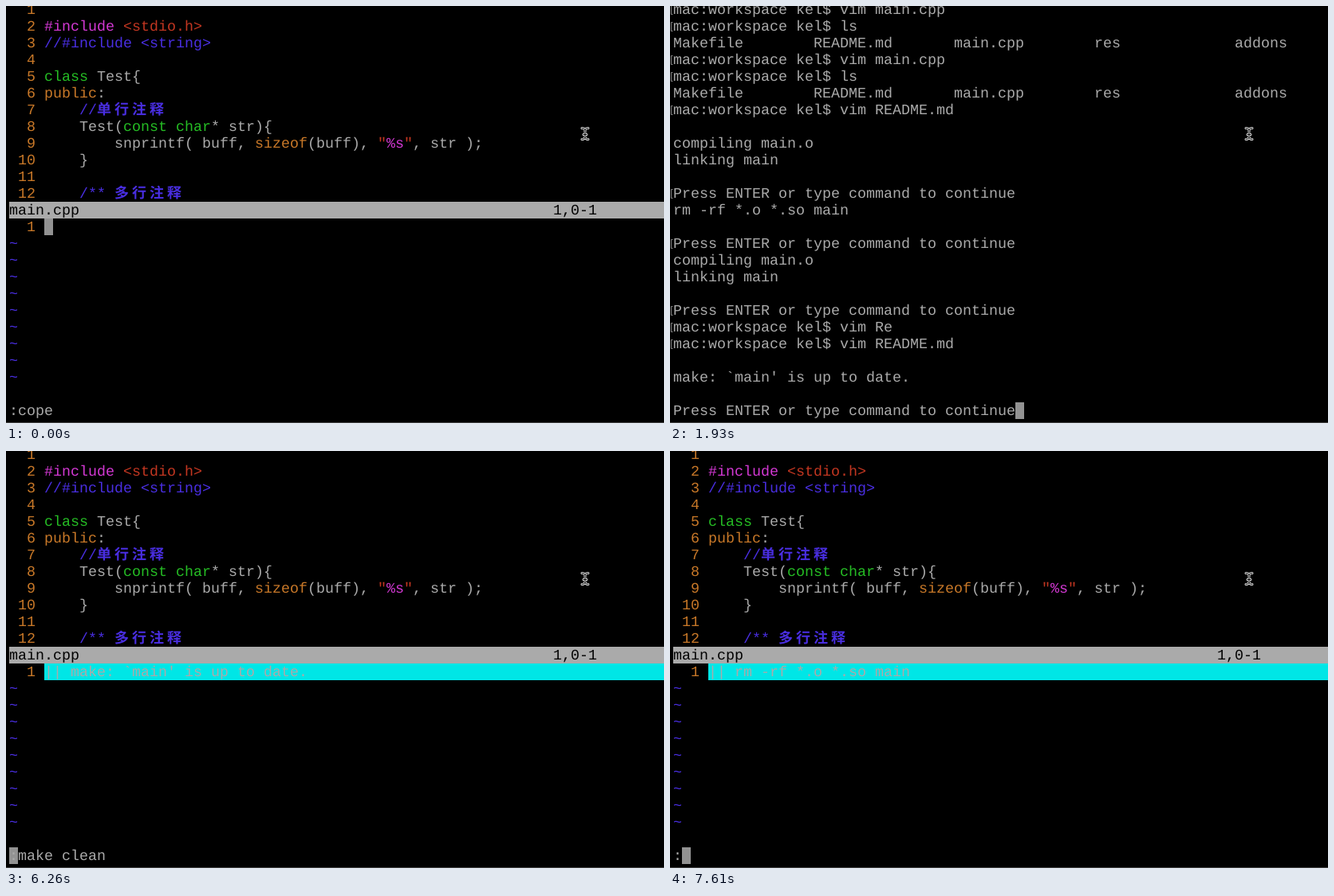
Write an HTML page that moves like this. It is 825 px wide and 524 px high and loops after 8 s.

```html
<!DOCTYPE html>
<html lang="en">
<head>
<meta charset="utf-8">
<title>Terminal editor</title>
<style>
  html, body { margin: 0; width: 100%; height: 100%; overflow: hidden; background: #000; }
  svg { display: block; width: 825px; height: 524px; }
  text {
    font: 18.33px "Liberation Mono", "Courier New", monospace;
    white-space: pre;
    text-rendering: geometricPrecision;
    fill: #aaa;
  }
  .cjk { font: bold 18px "Noto Sans CJK SC", "Noto Sans CJK", sans-serif; letter-spacing: 4px; }
  .orange { fill: #c87828; }
  .blue { fill: #492ee1; }
  .green { fill: #25bc24; }
  .magenta { fill: #d338d3; }
  .red { fill: #c23621; }
  .dark { fill: #000; }
  .mark { fill: none; stroke: #858585; }
</style>
</head>
<body>
<svg id="stage" viewBox="0 0 825 524"></svg>
<script>
const LOOP = 8000, CELL = 11, LINE = 21, QUICKFIX = 13, COMMAND = 24;
const stage = document.getElementById('stage');
const colX = col => 4 + col * CELL;
const rowY = row => row * LINE - 6;

function add(parent, tag, attrs = {}, content = '') {
  const node = document.createElementNS('http://www.w3.org/2000/svg', tag);
  for (const key in attrs) node.setAttribute(key, attrs[key]);
  node.textContent = content;
  return parent.appendChild(node);
}
const group = () => add(stage, 'g');
const write = (parent, row, col, content, color = '') =>
  add(parent, 'text', { x: colX(col), y: rowY(row) + 16, class: color }, content);
const fillRow = (parent, row, col, fill, width = 825) =>
  add(parent, 'rect', { x: colX(col), y: rowY(row), width, height: LINE, fill });
const show = (node, visible) => node.setAttribute('display', visible ? 'inline' : 'none');

// Backgrounds sit below the cursor, text above it.
const highlight = group();
fillRow(highlight, QUICKFIX, 4, '#00e6e6');
const cursor = fillRow(stage, 0, 0, '#929292', CELL);

const editor = group();
for (let n = 1; n <= 12; n++) write(editor, n - 1, n < 10 ? 2 : 1, String(n), 'orange');
[
  [1, 4, '#include', 'magenta'], [1, 13, '<stdio.h>', 'red'],
  [2, 4, '//#include <string>', 'blue'],
  [4, 4, 'class', 'green'], [4, 10, 'Test{'],
  [5, 4, 'public', 'orange'], [5, 10, ':'],
  [6, 8, '//', 'blue'], [6, 10, '单行注释', 'blue cjk'],
  [7, 8, 'Test('], [7, 13, 'const char', 'green'], [7, 23, '* str){'],
  [8, 12, 'snprintf( buff,'], [8, 28, 'sizeof', 'orange'], [8, 34, '(buff),'],
  [8, 42, '"', 'red'], [8, 43, '%s', 'magenta'], [8, 45, '"', 'red'], [8, 46, ', str );'],
  [9, 8, '}'],
  [11, 8, '/**', 'blue'], [11, 12, '多行注释', 'blue cjk']
].forEach(run => write(editor, ...run));
fillRow(editor, 12, 0, '#aaa');
write(editor, 12, 0, 'main.cpp', 'dark');
write(editor, 12, 62, '1,0-1', 'dark');
write(editor, QUICKFIX, 2, '1', 'orange');
for (let row = 14; row <= 22; row++) write(editor, row, 0, '~', 'blue');
const message = write(editor, QUICKFIX, 4, '');
const command = write(editor, COMMAND, 0, '');

const prompt = 'mac:workspace kel$ ';
const pause = 'Press ENTER or type command to continue';
const clean = 'rm -rf *.o *.so main';
const upToDate = "make: `main' is up to date.";
const listing = ['Makefile', 'README.md', 'main.cpp', 'res', 'addons']
  .map(name => name.padEnd(16)).join('').trimEnd();
const list = [prompt + 'vim main.cpp', prompt + 'ls', listing];
const build = ['compiling main.o', 'linking main', '', pause];
const log = [
  ...list, ...list, prompt + 'vim README.md', '',
  ...build, clean, '', pause, ...build,
  prompt + 'vim Re', prompt + 'vim README.md', '',
  upToDate, '', pause, clean, '', pause
];

function makeShell(firstLine) {
  const shell = group();
  log.slice(firstLine, firstLine + 25).forEach((content, row) => {
    write(shell, row, 0, content);
    const marked = content.startsWith(prompt) || content === pause;
    if (marked && row < COMMAND)
      add(shell, 'path', { class: 'mark', d: `M3.5 ${rowY(row) + 5.5}h-2v11h2` });
  });
  return shell;
}
const shells = [makeShell(0), makeShell(3)];

const beam = 'M722 153.5Q725 153.5 726 155.5Q727 153.5 730 153.5M726 155V166' +
  'M722 167.5Q725 167.5 726 165.5Q727 167.5 730 167.5M724 161.5H728';
for (const [stroke, width] of [['#ddd', 3], ['#000', 1]])
  add(stage, 'path', { d: beam, fill: 'none', stroke, 'stroke-width': width, 'stroke-linecap': 'round' });
add(stage, 'rect', { y: 523, width: 825, height: 1, fill: '#3a3a3a' });

// Each step: start time, quickfix message or shell index, command line, cursor column, cursor row.
const made = '|| ' + upToDate, cleaned = '|| ' + clean;
const steps = [
  [0, '', ':cope', 4, QUICKFIX],
  [290, '', ':', 1],
  [590, '', ':m', 2],
  [740, '', ':ma', 3],
  [880, '', ':make', 5],
  [1780, '', ':make', 0],
  [1930, 0, '', pause.length],
  [3880, made, '', 4, QUICKFIX],
  [4470, made, ':', 1],
  [4770, made, ':m', 2],
  [4920, made, ':ma', 3],
  [5070, made, ':make', 5],
  [5370, made, ':make ', 6],
  [5520, made, ':make c', 7],
  [5670, made, ':make cl', 8],
  [5820, made, ':make clea', 10],
  [5970, made, ':make clean', 11],
  [6260, made, ':make clean', 0],
  [6410, 1, '', pause.length],
  [7310, cleaned, '', 4, QUICKFIX],
  [7610, cleaned, ':', 1]
];

let current;
function render(step) {
  const [, view, typed, col, row = COMMAND] = step;
  const editing = typeof view === 'string';
  show(editor, editing);
  show(highlight, editing && view !== '');
  shells.forEach((shell, i) => show(shell, view === i));
  message.textContent = editing ? view : '';
  command.textContent = typed;
  cursor.setAttribute('x', colX(col));
  cursor.setAttribute('y', rowY(row));
}

const start = performance.now();
function tick() {
  const time = (performance.now() - start) % LOOP;
  const step = steps.findLast(([from]) => from <= time);
  if (step !== current) render(current = step);
  requestAnimationFrame(tick);
}
tick();
</script>
</body>
</html>
```
